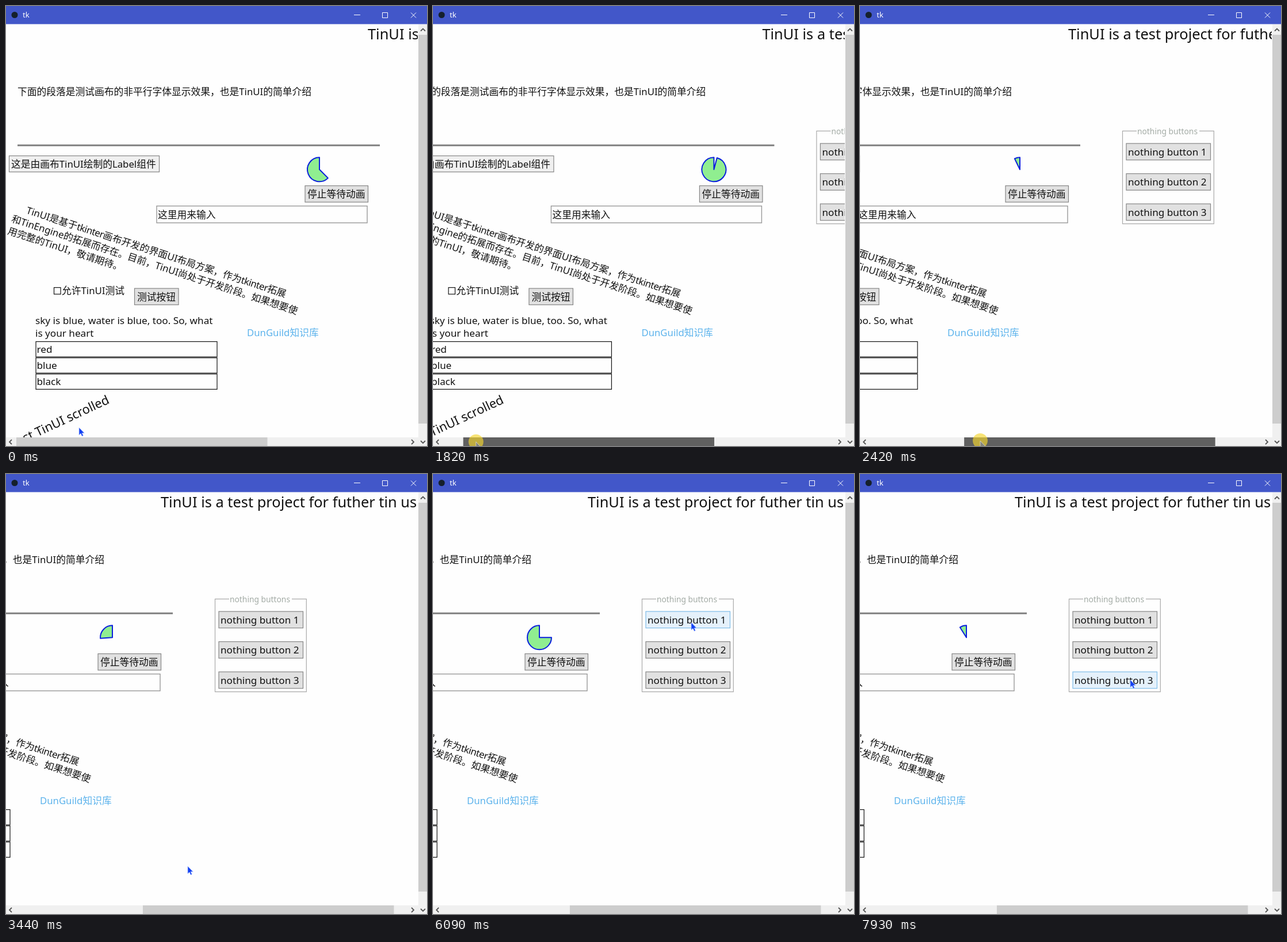
An HTML page that plays this animation: 732x765 px, repeating every 8 s.

```html
<!DOCTYPE html>
<html lang="zh-CN">
<head>
<meta charset="utf-8">
<title>tk</title>
<style>
  html, body { margin: 0; width: 100%; height: 100%; overflow: hidden; background: #fefefe; }
  svg { display: block; width: 732px; height: 765px; }
  text { font: 16.75px "Noto Sans", "Noto Sans CJK SC", "Noto Sans CJK", sans-serif; fill: #111; white-space: pre; }
  .latin { font-size: 17.15px; }
  .title { font-size: 25.4px; }
  .slanted { font-size: 21.7px; text-anchor: end; }
  .legend { font-size: 13.8px; fill: #a3aba5; }
  .link { fill: #5cb3ec; }
  .tight { letter-spacing: -.6px; }
  .caption { font-size: 13px; fill: #fff; }
  .button { fill: #e1e1e1; stroke: #858585; stroke-width: 1.2; }
  .button.hover { fill: #e5f1fb; stroke: #7ebce8; }
  .label { fill: #f0f0f0; }
  .entry { fill: #fefefe; stroke: #999; stroke-width: 1.4; }
  .row { fill: #fefefe; stroke: #111; stroke-width: 1.2; }
  .track { fill: #f0f0f0; }
  .thumb { fill: #cdcdcd; }
  .thumb.hover { fill: #a6a6a6; }
  .thumb.pressed { fill: #606060; }
  .arrows { fill: none; stroke: #555; stroke-width: 1.8; }
  .controls { fill: none; stroke: #fff; stroke-width: 1; }
  #cursor { fill: #1240f2; stroke: #b9ccff; stroke-width: .7; }
  #cursor.pressed { fill: #85857a; stroke: #e4e4e4; }
</style>
</head>
<body>
<svg viewBox="0 0 732 765">
  <defs><clipPath id="view"><rect y="32" width="716" height="718"/></clipPath></defs>
  <rect width="732" height="765" fill="#fefefe"/>
  <g clip-path="url(#view)">
    <g id="world">
      <text class="title" x="629" y="58">TinUI is a test project for futher tin us</text>
      <text x="20" y="155">下面的段落是测试画布的非平行字体显示效果，也是TinUI的简单介绍</text>
      <path d="M20 242.2H650" stroke="#808080" stroke-width="3"/>

      <rect class="button label" x="5.5" y="260.5" width="261" height="28"/>
      <text x="9" y="281">这是由画布TinUI绘制的Label组件</text>
      <path id="spinner" fill="#90ee90" stroke="#0a1fdc" stroke-width="2" stroke-linejoin="round"/>
      <rect class="button" x="520" y="312.5" width="109.5" height="28.5"/>
      <text x="524" y="333">停止等待动画</text>
      <rect class="entry" x="262" y="347.7" width="366" height="29.3"/>
      <text x="264" y="369">这里用来输入</text>

      <g transform="translate(15.3 354.1) rotate(18)">
        <text x="20">TinUI是基于<tspan class="tight">tkinter</tspan>画布开发的界面UI布局方案，作为<tspan class="tight">tkinter</tspan>拓展</text>
        <text y="22">和TinEngine的拓展而存在。目前，TinUI尚处于开发阶段。如果想要使</text>
        <text y="44">用完整的TinUI，敬请期待。</text>
      </g>

      <rect x="83.5" y="489.5" width="11.5" height="11.5" fill="#fefefe" stroke="#111" stroke-width="1.2"/>
      <text x="97" y="501">允许TinUI测试</text>
      <rect class="button" x="223.5" y="491" width="76.5" height="28.5"/>
      <text x="228" y="512">测试按钮</text>

      <text class="latin" x="51" y="553">sky is blue, water is blue, too. So, what</text>
      <text class="latin" x="51" y="575">is your heart</text>
      <g id="rows"></g>
      <text class="link" x="419" y="574">DunGuild知识库</text>
      <text class="slanted" transform="translate(181 690) rotate(-25)">test TinUI scrolled</text>

      <path d="M748 217.3H723.5V378.7H882.3V217.3H857" fill="none" stroke="#a9a9a9" stroke-width="1.2"/>
      <text class="legend" x="749" y="223">nothing buttons</text>
      <g id="buttons"></g>
    </g>
  </g>

  <rect width="732" height="31.5" fill="#4257c9"/>
  <circle cx="15" cy="15.5" r="5.5" fill="#15202c"/>
  <text class="caption" x="29" y="20">tk</text>
  <path class="controls" d="M605 15.5H616M654.5 11.5H663.5V20.5H654.5ZM704 11.5L713 20.5M713 11.5L704 20.5"/>

  <rect class="track" x="717" y="32" width="15" height="733"/>
  <rect class="thumb" x="717" y="50" width="15" height="676"/>
  <rect class="track" y="750" width="717" height="15"/>
  <rect id="thumb" class="thumb" y="750" width="436.5" height="15"/>
  <path class="arrows" d="M721 43.5L725 39.5L729 43.5M721 756L725 760L729 756M10 754L6 758L10 762M705 754L709 758L705 762"/>

  <circle id="press" r="13" fill="#f3d52f" fill-opacity=".66"/>
  <path id="cursor" d="M0 0V13L3 10.2L5.2 15L7.3 14L5.2 9.6H9.2Z"/>
</svg>
<script>
const LOOP = 8000, STEP = 68, PHASE = 40;
const PRESS = 1400, RELEASE = 2780;
const $ = id => document.getElementById(id);

// [time, value, ...]
const scrollKeys = [[1450, 0], [1550, 6], [1680, 22], [2080, 130], [2420, 267], [2660, 360]];
const cursorKeys = [
  [108, 127, 733], [500, 70, 742], [880, 38, 747], [960, 37, 755], [1400, 37, 757],
  [1550, 41, 759], [1680, 52, 758], [2080, 123, 757], [2420, 209, 756], [2640, 257, 755],
  [3050, 259, 755], [3240, 278, 744], [3440, 316, 682], [4140, 432, 376], [4280, 438, 358],
  [4600, 444, 307], [4900, 446, 284], [5040, 447, 262], [5500, 441, 230], [5800, 446, 250],
  [6090, 449, 258], [6400, 452, 298], [6630, 455, 307], [7450, 460, 317], [7600, 464, 333],
  [7760, 468, 353], [7930, 470, 358]
];

function sample(keys, t) {
  const next = keys.findIndex(k => k[0] > t);
  if (next === 0) return keys[0].slice(1);
  if (next < 0) return keys[keys.length - 1].slice(1);
  const a = keys[next - 1], b = keys[next], p = (t - a[0]) / (b[0] - a[0]);
  return a.slice(1).map((v, i) => v + (b[i + 1] - v) * p);
}

$('rows').innerHTML = ['red', 'blue', 'black'].map((name, i) => {
  const y = 583.5 + i * 28.2;
  return `<rect class="row" x="52" y="${y}" width="315" height="26.5"/>
    <text class="latin" x="53.5" y="${y + 19.5}">${name}</text>`;
}).join('');

const buttonTops = [239, 291.5, 344];
$('buttons').innerHTML = buttonTops.map((y, i) =>
  `<rect class="button" x="730" y="${y}" width="146.5" height="28.7"/>
   <text class="latin" x="733" y="${y + 20.5}">nothing button ${i + 1}</text>`).join('');
const buttons = document.querySelectorAll('#buttons rect');

// A pie that grows anticlockwise from twelve o'clock.
function piePath(degrees) {
  const cx = 545, cy = 284.3, r = 21, a = degrees * Math.PI / 180;
  const x = cx - r * Math.sin(a), y = cy - r * Math.cos(a);
  return `M${cx} ${cy}V${cy - r}A${r} ${r} 0 ${degrees > 180 ? 1 : 0} 0 ${x} ${y}Z`;
}

function draw(time) {
  const step = Math.floor((time + 5 - PHASE) / STEP);
  const t = step < 1 ? 0 : step * STEP + PHASE;
  const [scroll] = sample(scrollKeys, t);
  const [x, y] = sample(cursorKeys, t);
  const pressed = t >= PRESS && t < RELEASE;
  const place = `translate(${x} ${y})`;

  $('world').setAttribute('transform', `translate(${-scroll} 0)`);
  $('spinner').setAttribute('d', piePath((225 + t * .0665) % 360));
  $('thumb').setAttribute('x', 18 + scroll * .611);
  $('thumb').setAttribute('class', 'thumb' + (pressed ? ' pressed' : y >= 750 ? ' hover' : ''));
  $('press').setAttribute('transform', place);
  $('press').setAttribute('visibility', pressed ? 'visible' : 'hidden');
  $('cursor').setAttribute('transform', place);
  $('cursor').setAttribute('class', pressed ? 'pressed' : '');
  buttons.forEach((button, i) => {
    const top = buttonTops[i], left = 730 - scroll;
    const inside = x > left && x < left + 146.5 && y >= top && y <= top + 29;
    button.classList.toggle('hover', inside);
  });
}

function tick(now) {
  draw(now % LOOP);
  requestAnimationFrame(tick);
}
draw(0);
requestAnimationFrame(tick);
</script>
</body>
</html>
```
